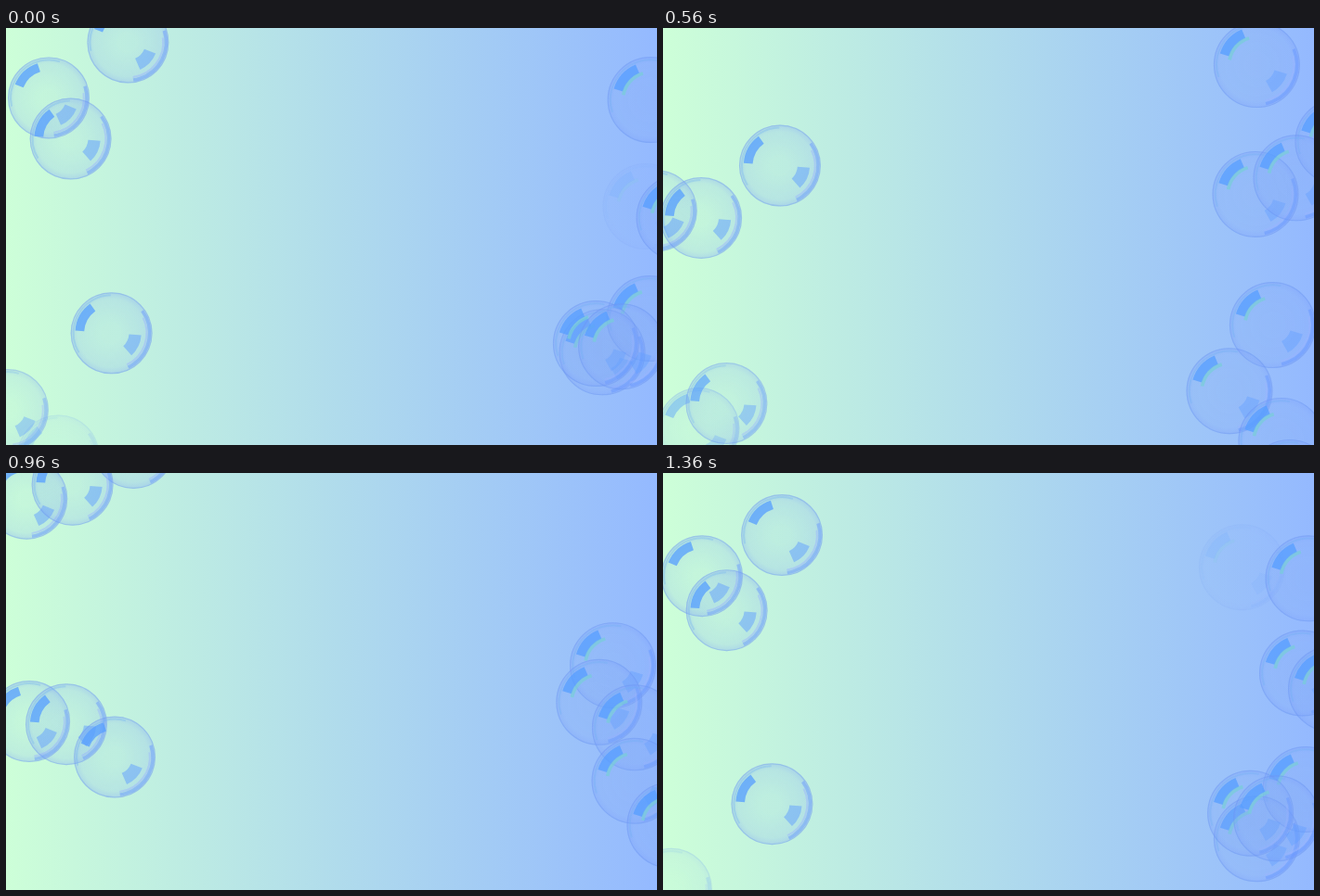
These frames come from a looping animation (701 by 450 pixels, 1440 ms). An HTML page with a canvas:

```html
<!DOCTYPE html>
<html lang="en">
<head>
<meta charset="utf-8">
<title>Rising bubbles</title>
<style>
  html, body { margin: 0; width: 701px; height: 450px; overflow: hidden; }
  canvas { display: block; background: linear-gradient(90deg, #cdffd8, #94b9ff); }
</style>
</head>
<body>
<canvas id="stage" width="701" height="450"></canvas>
<script>
const ctx = document.getElementById('stage').getContext('2d');
const STEP = 80, STEPS = 18, MIDDLE = 250, SURGE = 0.08;

// mid: step at which the bubble is halfway up; speed: px per step there;
// x, sway: centre and width of the swing; turn: step of its leftmost point
const leftBubbles = [
  { mid: 21.1, speed: 24.8, x: 124, sway: 14 },
  { mid: 23.2, speed: 29, x: 4, sway: 20 },
  { mid: 5.7, speed: 34.5, x: 55, sway: 20 },
  { mid: 12.6, speed: 30, x: 38, sway: 13 },
  { mid: 12.9, speed: 23.5, x: 68, sway: 3, pop: 20 },
  { mid: 13.2, speed: 47, x: 127, sway: 10 }
];
const rightBubbles = [
  { mid: 10.1, speed: 22, x: 648, sway: 11, turn: 0, pop: 14 },
  { mid: 11.9, speed: 27, x: 620, sway: 20, turn: 4, pop: 17 },
  { mid: 12.8, speed: 31, x: 680, sway: 15, turn: 8, pop: 20 },
  { mid: 15.5, speed: 22.5, x: 681, sway: 8, turn: 9, pop: 18 },
  { mid: 16.4, speed: 28, x: 728, sway: 17, turn: 14, pop: 22 },
  { mid: 20.4, speed: 26, x: 710, sway: 18, turn: 17, pop: 27 },
  { mid: 20.3, speed: 43, x: 638, sway: 8, turn: 12 },
  { mid: 21.9, speed: 22, x: 634, sway: 8, turn: 13, pop: 26 },
  { mid: 21.6, speed: 25, x: 671, sway: 11, turn: 16, pop: 28 }
];

function band(radius, angle, spread, width, color) {
  const rad = Math.PI / 180;
  ctx.beginPath();
  ctx.arc(0, 0, radius, (angle - spread) * rad, (angle + spread) * rad);
  ctx.lineWidth = width;
  ctx.strokeStyle = color;
  ctx.stroke();
}

function drawBubble(x, y, r, tilt, alpha, onRight) {
  ctx.save();
  ctx.translate(x, y);
  ctx.globalAlpha = alpha;
  const film = ctx.createRadialGradient(0, 0, r * 0.2, 0, 0, r);
  film.addColorStop(0, onRight ? 'rgba(125,165,240,.17)' : 'rgba(125,175,240,.08)');
  film.addColorStop(0.8, 'rgba(125,165,245,.18)');
  film.addColorStop(1, 'rgba(120,155,250,.34)');
  ctx.fillStyle = film;
  ctx.beginPath();
  ctx.arc(0, 0, r, 0, 2 * Math.PI);
  ctx.fill();

  band(r - 0.6, 0, 180, 1.2, 'rgba(100,145,235,.3)');
  band(r * 0.93, tilt + 165, 50, 3.5, 'rgba(100,150,255,.45)');
  band(r * 0.86, tilt + 170, 45, 2, 'rgba(155,180,255,.45)');
  band(r * 0.93, tilt, 60, 2, 'rgba(110,175,240,.3)');
  band(r * 0.78, tilt, 25, r * 0.22, 'rgba(85,158,255,.75)');
  if (onRight) band(r * 0.64, tilt, 32, r * 0.08, 'rgba(120,205,215,.7)');
  band(r * 0.58, tilt + 177, 22, r * 0.3, `rgba(95,158,255,${onRight ? 0.4 : 0.5})`);
  ctx.restore();
}

function drawGroup(bubbles, step, r, onRight) {
  bubbles.forEach(({ mid, speed, x, sway, turn = mid - 1, pop = Infinity }, i) => {
    const tilt = onRight ? 222 : i % 2 ? 227 : 209;
    for (const s of [step, step + STEPS]) {
      const t = s - mid;
      const y = MIDDLE - speed * t - SURGE * t ** 3;
      if (s > pop || y < -r || y > 450 + r) continue;
      const swing = sway * Math.cos(2 * Math.PI * (s - turn) / STEPS);
      const fadeIn = onRight ? 1 : Math.max(0, Math.min(1, (490 - y) / 100));
      drawBubble(x - swing, y, r, tilt, s === pop ? 0.2 : fadeIn, onRight);
    }
  });
}

function render() {
  const step = Math.floor(performance.now() / STEP) % STEPS;
  ctx.clearRect(0, 0, 701, 450);
  drawGroup(leftBubbles, step, 44, false);
  drawGroup(rightBubbles, step, 46.5, true);
  requestAnimationFrame(render);
}
render();
</script>
</body>
</html>
```
